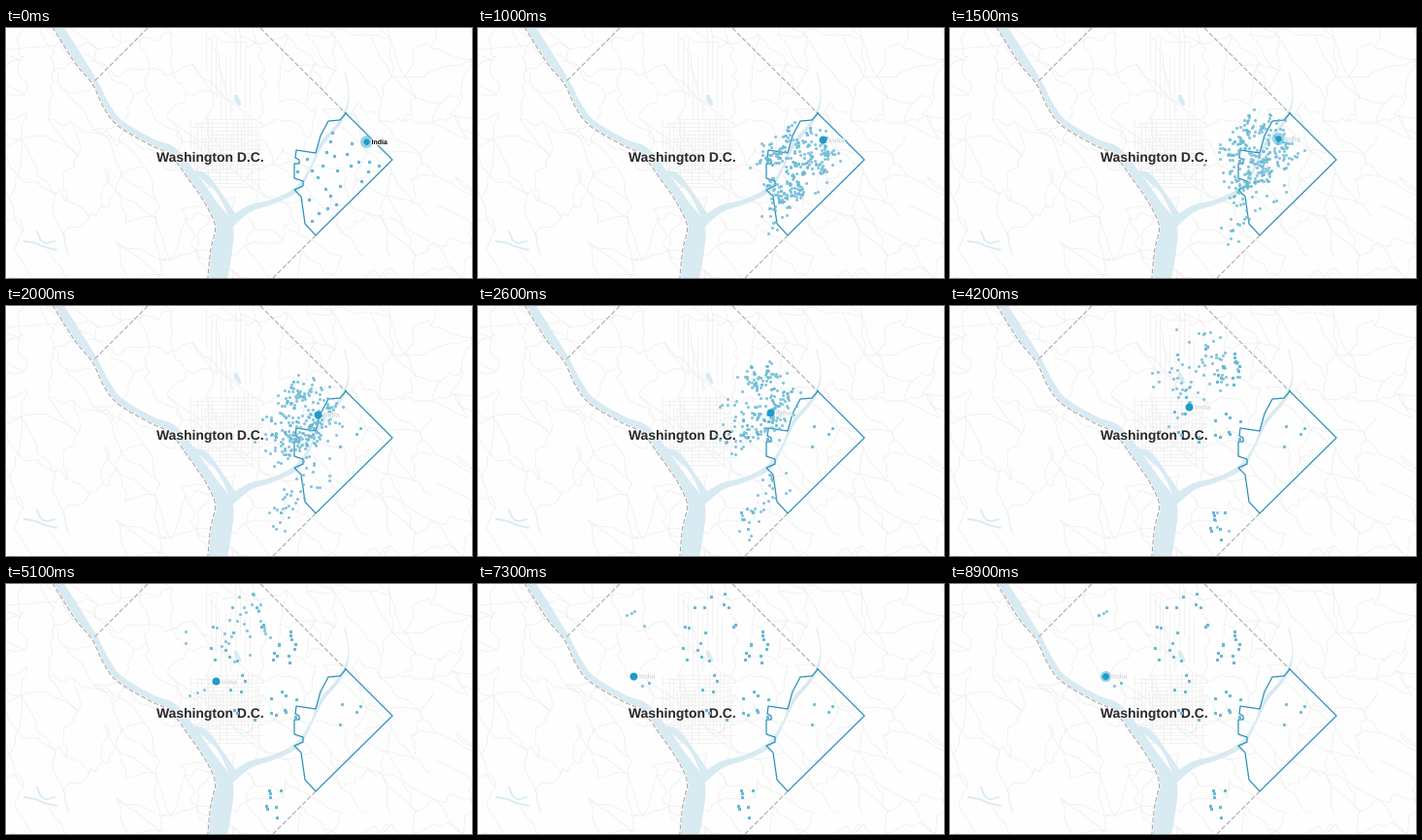
Animation, 480 px wide and 258 px high, one loop 9 s. Source, as a matplotlib script:

```python
import numpy as np
import matplotlib.pyplot as plt
import matplotlib.patheffects as pe
from matplotlib.animation import FuncAnimation
from matplotlib.collections import LineCollection
from matplotlib.path import Path

W, H, DPI = 480, 258, 100
FRAMES, STEP = 90, 100
PX = 72 / DPI                     # points per pixel
SPEED = 34.2                      # pixels per second

ROAD, WATER, BORDER = "#efefef", "#d8eaf2", "#a3a3a3"
WARD, DOT, LEAD = "#2a91b9", "#69b9d6", "#1f9bca"

rng = np.random.default_rng(7)
fig = plt.figure(figsize=(W / DPI, H / DPI), dpi=DPI, facecolor="#fefefe")
ax = fig.add_axes([0, 0, 1, 1])
ax.set(xlim=(0, W), ylim=(H, 0))
ax.axis("off")


def area(diameter):
    return (diameter * PX) ** 2


def smooth(pts, n=10):
    """Catmull-Rom curve through the points."""
    p = np.asarray(pts, float)
    p = np.vstack([2 * p[0] - p[1], p, 2 * p[-1] - p[-2]])
    t = np.linspace(0, 1, n, endpoint=False)[:, None]
    parts = []
    for a, b, c, d in zip(p, p[1:], p[2:], p[3:]):
        parts.append(0.5 * (2 * b + (c - a) * t + (2 * a - 5 * b + 4 * c - d) * t**2
                            + (3 * b - a - 3 * c + d) * t**3))
    return np.vstack(parts + [p[-2:-1]])


def line(pts, color, width, dash=None, z=3):
    style = (0, dash) if dash else "-"
    ax.plot(*np.asarray(pts).T, color=color, lw=width * PX, ls=style, zorder=z,
            solid_joinstyle="round", dash_capstyle="butt")


def river(pts):
    """Fill a course of (x, y, width) points and return its right bank."""
    c = smooth(pts)
    d = np.gradient(c[:, :2], axis=0)
    d /= np.hypot(d[:, 0], d[:, 1])[:, None]
    normal = np.column_stack([-d[:, 1], d[:, 0]])
    off = normal * c[:, 2:] / 2
    ax.fill(*np.vstack([c[:, :2] + off, (c[:, :2] - off)[::-1]]).T,
            color=WATER, lw=0, zorder=2)
    return c[:, :2] + off + normal


def draw_roads(cell=27):
    """Winding country lanes on a loose mesh, with a fine street grid downtown."""
    lanes = []
    rows, cols = H // cell + 3, W // cell + 3
    gy, gx = np.mgrid[0:rows, 0:cols] * cell - cell / 2
    nodes = np.dstack([gx, gy]) + rng.uniform(-11, 11, (rows, cols, 2))
    for r in range(rows - 1):
        for c in range(cols - 1):
            for end in (nodes[r + 1, c], nodes[r, c + 1], nodes[r + 1, c + 1]):
                if rng.random() < 0.55:
                    k = np.linspace(0, 1, 5)[:, None]
                    path = nodes[r, c] + (end - nodes[r, c]) * k
                    path[1:-1] += rng.normal(0, 2, (3, 2))
                    lanes.append(smooth(path, 4))

    for x in np.arange(190, 264, 3.7):
        lanes.append([(x, rng.uniform(88, 112)), (x, rng.uniform(140, 168))])
    for y in np.arange(94, 166, 3.9):
        lanes.append([(rng.uniform(184, 208), y), (rng.uniform(236, 272), y)])
    for x in np.arange(206, 254, 5):
        y = rng.uniform(0, 45)
        lanes.append([(x, y), (x, y + rng.uniform(40, 70))])
    ax.add_collection(LineCollection(lanes, colors=ROAD, linewidths=0.8 * PX, zorder=1))


def draw_water():
    bank = river([(50, -8, 9), (75, 32, 9), (92, 56, 5), (104, 80, 6), (118, 98, 6),
                  (150, 117, 6), (172, 127, 8), (192, 152, 9), (212, 181, 10),
                  (225, 205, 17), (222, 232, 21), (217, 268, 18)])
    river([(194, 148, 3), (205, 154, 7), (220, 171, 4), (235, 197, 8)])
    river([(226, 205, 10), (250, 187, 7), (275, 179, 5), (300, 166, 5), (314, 144, 2),
           (325, 120, 4), (346, 94, 3), (353, 70, 1), (349, 45, 1)])
    river([(236, 69, 3), (238, 74, 5), (241, 80, 3)])
    line(smooth([(19, 220), (30, 222), (40, 226), (52, 229)]), WATER, 1.8)
    line(smooth([(32, 210), (36, 219), (42, 222), (50, 220)]), WATER, 1.6)
    return bank


def draw_borders(bank):
    dash = (5, 2.2)
    for ends in ([(146, 0), (91, 55)], [(262, 0), (350, 88)], [(319, 214), (275, 258)]):
        line(ends, BORDER, 1, dash)
    line(bank, BORDER, 1, dash)
    line(WARD_EDGE, WARD, 1.25, z=4)


# Clockwise from the northern corner
WARD_EDGE = [(350, 88), (398, 136), (319, 214), (308, 202), (304, 174), (297, 167),
             (306, 163), (306, 158), (297, 155), (297, 140), (302, 140), (302, 136),
             (298, 134), (299, 126), (319, 129), (324, 111), (332, 96), (344, 95),
             (350, 88)]

# School districts: centre, half extent, schools, pupils
DISTRICTS = [
    ((280, 62), (18, 20), 14, 105),
    ((225, 60), (14, 20), 9, 26),
    ((243, 13), (20, 13), 6, 24),
    ((278, 126), (24, 16), 10, 55),
    ((238, 116), (10, 22), 6, 26),
    ((160, 27), (8, 5), 3, 4),
    ((175, 101), (12, 8), 2, 3),
    ((277, 228), (11, 20), 8, 40),
    ((349, 141), (16, 18), 4, 8),
]


def make_homes(count, gap=9):
    """Scatter homes inside the ward, none too close together."""
    ward, homes = Path(WARD_EDGE), []
    while len(homes) < count:
        p = rng.uniform((300, 98), (386, 202))
        clear = all(np.hypot(*(p - q)) > gap for q in homes)
        if clear and ward.contains_point(p, radius=0):
            homes.append(p)
    return np.array(homes)


def make_trips():
    homes = make_homes(27)
    ends = []
    for centre, extent, schools, pupils in DISTRICTS:
        spots = centre + rng.uniform(-1, 1, (schools, 2)) * extent
        ends.append(spots[np.arange(pupils) % schools])
    ends = np.vstack(ends)
    n = len(ends)
    starts = homes[rng.integers(0, len(homes), n)]
    return starts, ends, rng.uniform(0.3, 0.65, n), SPEED * rng.uniform(0.94, 1.14, n)


def travel(start, end, elapsed, pace):
    """Walk straight at a steady pace, then stay."""
    gap = end - start
    dist = np.maximum(np.hypot(gap[..., 0], gap[..., 1]), 1e-6)
    k = np.clip(elapsed * pace / dist, 0, 1)
    return start + gap * k[..., None]


draw_roads()
draw_borders(draw_water())
halo = [pe.withStroke(linewidth=2 * PX, foreground="white", alpha=0.8)]
label = dict(family="Liberation Sans", weight="bold", va="baseline", path_effects=halo)
ax.text(155, 138, "Washington D.C.", size=13.9 * PX, color="#2b2b2b", zorder=5, **label)

START, END, DELAY, PACE = make_trips()
LEAD_START, LEAD_END = np.array([370.5, 117]), np.array([160, 94.5])

dots = ax.scatter(*START.T, s=area(3.1), c=DOT, lw=0, alpha=0.8, zorder=6)
pulse = ax.scatter([0], [0], s=1, c="#55b8dc", lw=0, alpha=0.6, zorder=7)
lead = ax.scatter([0], [0], s=1, c=LEAD, lw=0, zorder=8)
name = ax.text(0, 0, "India", size=7 * PX, color="#111111", zorder=9, **label)


def update(i):
    t = i * STEP / 1000
    dots.set_offsets(travel(START, END, np.maximum(t - DELAY, 0), PACE))
    pos = travel(LEAD_START, LEAD_END, max(t - 0.55, 0), SPEED)
    beat = max(0, np.cos(2 * np.pi * t / 1.5)) ** 4
    lead.set_offsets([pos])
    lead.set_sizes([area(8 - 1.6 * beat)])
    pulse.set_offsets([pos])
    pulse.set_sizes([area(7 + 6 * beat)])
    name.set_position((pos[0] + 6, pos[1] + 3))
    name.set_alpha(float(np.clip((0.8 - t) / 0.3, 0, 1)))
    return dots, pulse, lead, name


anim = FuncAnimation(fig, update, frames=FRAMES, init_func=lambda: update(0),
                     interval=STEP, repeat=True, repeat_delay=0)
plt.show()
```
